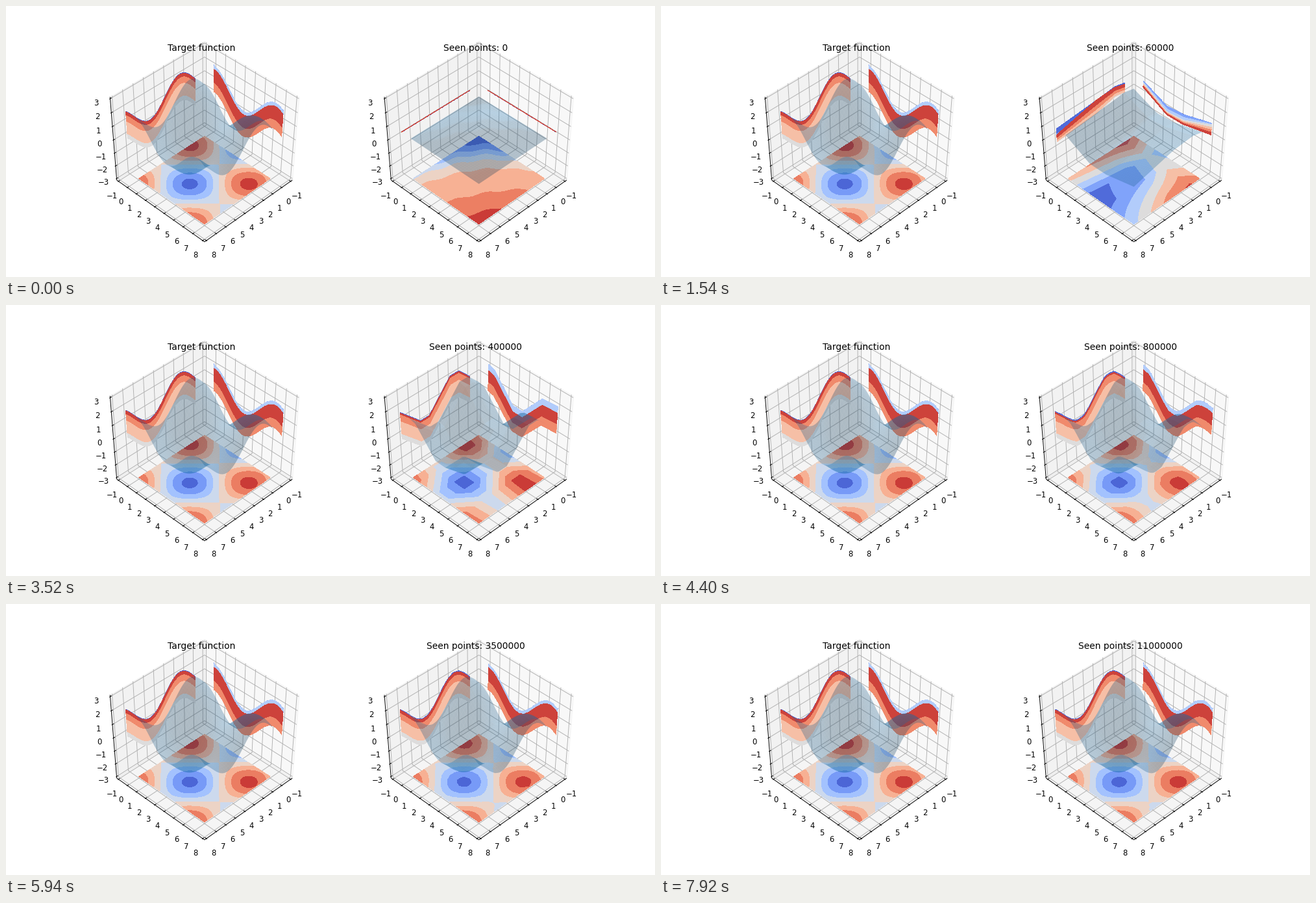
A matplotlib script for the animation above (8.14 s loop, 1000 px wide and 417 px high).

```python
import numpy as np
import matplotlib.pyplot as plt
from matplotlib.animation import FuncAnimation
from matplotlib.collections import LineCollection, PolyCollection

W, H, FRAMES, STEP_MS = 1000, 417, 37, 220
PT = 5 / 6                        # point scale on this canvas
ROOT2 = np.sqrt(2)
LO, HI, ZLO, ZHI = -1.1875, 8.1875, -3.125, 3.125   # pane bounds
DX, DZ = 9 / 12, 6 / 12           # tick units
LEFT, RIGHT = 305.9, 728.6        # screen centre of each cube

plt.rcParams["font.family"] = "DejaVu Sans"
fig = plt.figure(figsize=(W / 100, H / 100), dpi=100, facecolor="white")
ax = fig.add_axes([0, 0, 1, 1])
ax.set(xlim=(0, W), ylim=(H, 0))
ax.axis("off")
ax.set_autoscale_on(False)

axis = np.linspace(0, 7, 71)
X, Y = np.meshgrid(axis, axis)


def project(x, y, z, cx):
    """Perspective view from azimuth 45, elevation 45."""
    x, y, z = (x - 3.5) / 9, (y - 3.5) / 9, z / 6
    side, near = (y - x) / ROOT2, (x + y) / ROOT2
    depth = 10 - (z + near) / ROOT2
    up = (z - near) / ROOT2
    return cx + 1904.2 * side / depth, 206.2 - 1735.6 * up / depth, depth


def path(points, cx):
    return [project(*p, cx)[:2] for p in points]


def draw_box(cx):
    panes = [
        ([(LO, LO, ZLO), (LO, HI, ZLO), (LO, HI, ZHI), (LO, LO, ZHI)], 0.95),
        ([(LO, LO, ZLO), (HI, LO, ZLO), (HI, LO, ZHI), (LO, LO, ZHI)], 0.90),
        ([(LO, LO, ZLO), (HI, LO, ZLO), (HI, HI, ZLO), (LO, HI, ZLO)], 0.925),
    ]
    for corners, g in panes:
        color = (g, g, g, 0.5)
        ax.add_collection(PolyCollection([path(corners, cx)], facecolors=[color],
                                         edgecolors=[color], linewidths=PT, zorder=1))
    grid, marks, labels = [], [], []
    gap = 0.949                   # label distance in tick units
    a, b = HI + 0.1 * DX, HI - 0.2 * DX
    out, low = HI + gap * DX, ZLO - gap * DZ
    for t in range(-1, 9):
        grid.append([(t, HI, ZLO), (t, LO, ZLO), (t, LO, ZHI)])
        grid.append([(HI, t, ZLO), (LO, t, ZLO), (LO, t, ZHI)])
        marks.append([(t, a, ZLO), (t, b, ZLO)])
        marks.append([(a, t, ZLO), (b, t, ZLO)])
        labels += [(t, (t, out, low)), (t, (out, t, low))]
    for t in range(-3, 4):
        grid.append([(LO, HI, t), (LO, LO, t), (HI, LO, t)])
        marks.append([(a, LO, t), (b, LO, t)])
        labels.append((t, (out, LO - gap * DX, t)))
    spines = [[(LO, HI, ZLO), (HI, HI, ZLO)], [(HI, LO, ZLO), (HI, HI, ZLO)],
              [(HI, LO, ZLO), (HI, LO, ZHI)]]
    for lines, color in ((grid, "#b0b0b0"), (spines, "black"), (marks, "black")):
        ax.add_collection(LineCollection([path(p, cx) for p in lines], colors=color,
                                         linewidths=0.8 * PT, zorder=2))
    for t, pos in labels:
        px, py, _ = project(*pos, cx)
        ax.text(px, py, str(t).replace("-", "\u2212"), fontsize=10 * PT,
                ha="center", va="top", zorder=5)


def draw_title(cx, text):
    return ax.text(cx - 5.2, 68.8, text, fontsize=12 * PT, ha="center",
                   va="baseline", zorder=6)


def draw_surface(Z, cx):
    x, y, z = (m[::2, ::2] for m in (X, Y, Z))
    px, py, depth = project(x, y, z, cx)

    def corners(m):
        return np.stack([m[:-1, :-1], m[:-1, 1:], m[1:, 1:], m[1:, :-1]], -1).reshape(-1, 4)

    fx = (np.diff(z, axis=1) / np.diff(x, axis=1))[:-1]
    fy = (np.diff(z, axis=0) / np.diff(y, axis=0))[:, 1:]
    light = ((fx + fy + 0.5) / np.sqrt(fx**2 + fy**2 + 1)).ravel()
    light = (light - light.min()) / max(np.ptp(light), 1e-12)
    rgba = np.full((light.size, 4), 0.3)
    rgba[:, :3] = (0.5 + 0.5 * light[:, None]) * np.array([31, 119, 180]) / 255
    order = np.argsort(-corners(depth).mean(1))
    quads = np.stack([corners(px), corners(py)], -1)
    return ax.add_collection(PolyCollection(quads[order], facecolors=rgba[order],
                                            edgecolors="none", linewidths=0,
                                            antialiased=True, zorder=4))


def draw_function(Z, cx):
    """Surface plus its filled contours on the floor and both walls."""
    parts = []
    for x, y, z, value in ((X, Y, -3, Z), (-1, Y, Z, X), (X, -1, Z, Y)):
        px, py, _ = project(x, y, z + 0 * X, cx)
        parts.append(ax.contourf(px, py, value, 6, cmap="coolwarm", zorder=3))
    parts.append(draw_surface(Z, cx))
    ax.set(xlim=(0, W), ylim=(H, 0))
    return parts


def hats(knots):
    return np.array([np.interp(axis, knots, row) for row in np.eye(len(knots))])


def first_guess():
    s, d = X + Y, Y - X
    bend = s - 0.06 * d**2 * np.clip(1 - s / 14, 0, 1) + 0.03 * d * s + 0.15 * np.sin(2 * d)
    h = np.interp(bend, [0, 1.4, 2.4, 3.2, 4.1, 5.6, 9.5, 12.3, 14],
                  [0.5, 1, 2, 3, 4, 5, 6, 7, 7.4])
    return 0.1 + 0.004 * h


def early_guess():
    t = Y - X + 0.9 - 0.07 * (X + Y)
    slope = np.interp(t, [-8, 0, 4, 5.4, 7.4], [0.08, 2, 6, 7, 7.4])
    slope -= 0.3 * np.maximum(X - 5.8, 0) * (t < 0)
    ridge = (3 + 1.2 * np.maximum(2.2 - X, 0) - 0.05 * X
             - np.interp(Y, [0, 1, 7], [0, 1.1, 4]))
    return -0.06 + 0.015 * np.maximum(slope, ridge)


def folded_guess():
    heights = np.array([[1.55, 1.95, 1.55, 0.87],
                        [-0.2, 0.1, -0.85, -1.35],
                        [0.0, 0.35, -0.6, -1.3],
                        [1.3, 1.75, 1.5, -0.15]])
    return hats([0, 2.5, 4.2, 7]).T @ heights @ hats([0, 1, 3, 7])


def rough_guess():
    a = np.interp(X, [0, 1.1, 2, 4.2, 5.1, 7], [0.1, 0.97, 0.97, -0.97, -0.97, 0.5])
    b = np.interp(Y, [0, 0.6, 2.6, 3.6, 5.5, 7], [1, 0.88, -0.93, -0.93, 0.85, 0.95])
    return a + b


def fine_guess(n):
    k = np.linspace(0, 7, n)
    return np.interp(X, k, np.sin(k)) + np.interp(Y, k, np.cos(k))


STAGES = {0: first_guess(), 4: early_guess(), 11: folded_guess(), 16: rough_guess(),
          24: fine_guess(14), 31: fine_guess(18), 36: fine_guess(24)}
KEYS = list(STAGES)
COUNTS = [*range(0, 10_000, 2_000), *range(20_000, 200_000, 20_000),
          *range(200_000, 1_000_000, 100_000), *range(1_000_000, 5_000_000, 500_000),
          *range(5_000_000, 12_000_000, 1_000_000)]


def prediction(i):
    k = min(np.searchsorted(KEYS, i, side="right"), len(KEYS) - 1)
    a, b = KEYS[k - 1], KEYS[k]
    w = (i - a) / (b - a)
    return (1 - w) * STAGES[a] + w * STAGES[b]


for center in (LEFT, RIGHT):
    draw_box(center)
draw_title(LEFT, "Target function")
draw_function(np.sin(X) + np.cos(Y), LEFT)
caption = draw_title(RIGHT, "")
shown = []


def update(i):
    while shown:
        shown.pop().remove()
    shown.extend(draw_function(prediction(i), RIGHT))
    caption.set_text(f"Seen points: {COUNTS[i]}")
    return [caption]


anim = FuncAnimation(fig, update, frames=FRAMES, interval=STEP_MS, repeat=True,
                     repeat_delay=0, blit=False)
plt.show()
```
